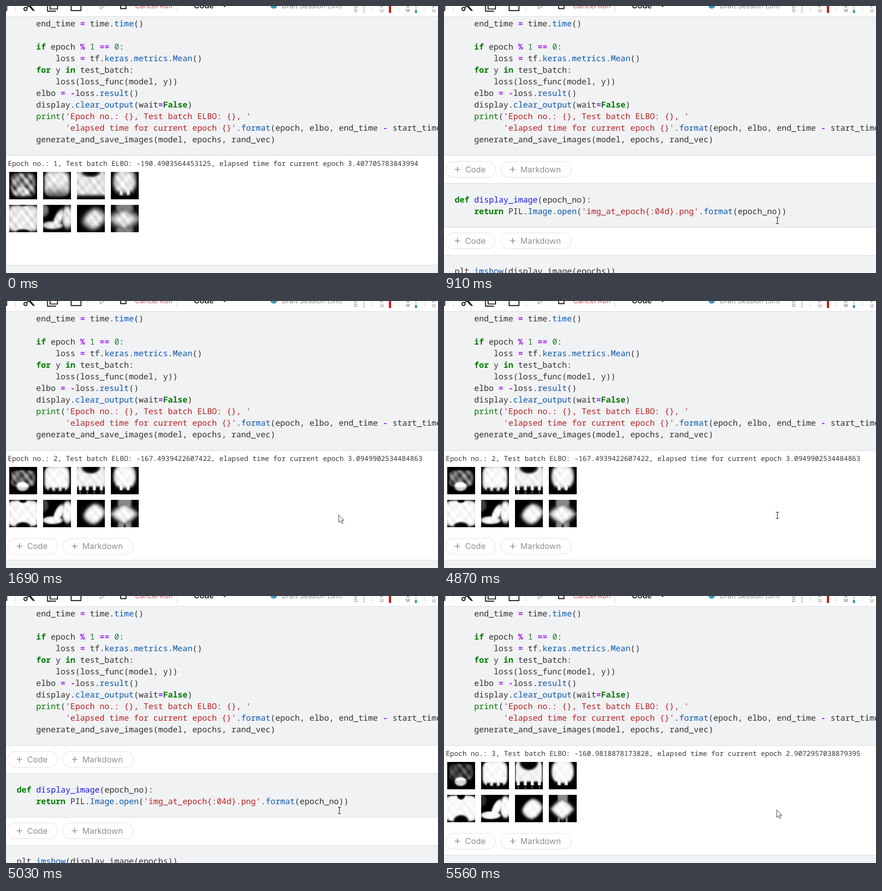
An HTML page with a canvas for the animation above (8 s loop, 931 by 576 pixels).

```html
<!DOCTYPE html>
<html lang="en">
<head>
<meta charset="utf-8">
<title>Notebook training output</title>
<style>
html, body { margin: 0; width: 100%; height: 100%; overflow: hidden; background: #fff; }
svg { display: block; }
canvas { position: absolute; left: 0; top: 350px; }
text { white-space: pre; text-rendering: geometricPrecision; }
.code { font: 17.54px "Noto Sans Mono", monospace; fill: #303030; }
.out { font: 14.9px "Noto Sans Mono", monospace; fill: #383838; }
.ui { font-family: Inter, sans-serif; }
.k { fill: #007a00; font-weight: 700; }
.b { fill: #007a00; }
.o { fill: #a21ff5; font-weight: 700; }
.s { fill: #ba2121; }
.n { fill: #1b7a2b; }
.p { fill: #0b57ad; }
.f { fill: #1a1ae6; }
</style>
</head>
<body>
<svg id="stage" width="931" height="576" viewBox="0 0 931 576">
  <rect width="931" height="576" fill="#fff"/>
  <g id="main"></g>
  <text id="log" class="out" x="4" y="345"></text>
  <g id="below"></g>
  <g id="bar"></g>
  <path id="arrow" d="M0 0V16L3.7 12.6 6.3 18.3 9 17.2 6.5 11.6H11.3Z" fill="#fff" stroke="#222"/>
  <path id="beam" d="M715 455.5h2.5l1 1 1-1h2.5M718.5 456.5v12M715 469.5h2.5l1-1 1 1h2.5"
    fill="none" stroke="#222" stroke-width="1.2"/>
</svg>
<canvas id="tiles" width="300" height="150"></canvas>
<script>
const $ = id => document.getElementById(id);
const rep = (list, fn) => list.map(fn).join('');

// Tokens are split by "|"; an optional "x~" prefix names the colour class.
function code(x, y, src) {
  const spans = rep(src.split('|'), tok => {
    const m = /^([kbosnpf])~(.*)$/.exec(tok);
    return m ? `<tspan class="${m[1]}">${m[2]}</tspan>` : tok;
  });
  return `<text class="code" x="${x}" y="${y}">${spans}</text>`;
}

const label = (x, y, size, color, str, extra = '') =>
  `<text class="ui" x="${x}" y="${y}" font-size="${size}" fill="${color}" ${extra}>${str}</text>`;

const cell = (y, h) =>
  `<rect x="-4.5" y="${y}" width="960" height="${h}" rx="7" fill="#f1f2f4" stroke="#d8dadd"/>`;

function pill(x, y, w, str) {
  return `<rect x="${x}" y="${y}" width="${w}" height="34" rx="17" fill="#fff" stroke="#dcdee0"/>
    <path d="M${x + 19.5} ${y + 17}h12m-6-6v12" stroke="#8c8c8c" stroke-width="1.6"/>` +
    label(x + 42, y + 23.3, 17.5, '#8f8f8f', str);
}
const buttons = y => pill(3.5, y, 108, 'Code') + pill(122.5, y, 152, 'Markdown');

const lines = [
  'end_time |o~=| time.|p~time|()',
  '',
  'k~if| epoch |o~%| |n~1| |o~==| |n~0|:',
  '    loss |o~=| tf.|p~keras|.|p~metrics|.|p~Mean|()',
  'k~for| y |k~in| test_batch:',
  '    loss(loss_func(model, y))',
  'elbo |o~=| |o~-|loss.|p~result|()',
  'display.|p~clear_output|(wait|o~=|k~False|)',
  "b~print|(|s~'Epoch no.: {}, Test batch ELBO: {}, '",
  "      |s~'elapsed time for current epoch {}'|.|p~format|(epoch, elbo, end_time |o~-| start_time))",
  'generate_and_save_images(model, epochs, rand_vec)'
];
$('main').innerHTML = cell(-40, 362.5) + rep(lines, (s, i) => code(65, 44 + 25 * i, s));

$('below').innerHTML = `<g id="first">${buttons(335.5)}</g>` + cell(382.5, 95) +
  code(23, 424, 'k~def| |f~display_image|(epoch_no):') +
  code(65, 449, "k~return| PIL.|p~Image|.|p~open|(|s~'img_at_epoch{:04d}.png'|.|p~format|(epoch_no))") +
  buttons(489.5) + cell(538, 95) +
  code(23, 578, 'plt.|p~imshow|(display_image(epochs))');

const meter = (x, a, b, fill, top) =>
  label(x, 3.6, 9.5, '#666', a, 'text-anchor="middle"') +
  label(x, 12.6, 9.5, '#666', b, 'text-anchor="middle"') +
  `<path d="M${x + 17.5} 0V15" stroke="#e2e2e2" stroke-width="5"/>
   <path d="M${x + 17.5} ${top}V15" stroke="${fill}" stroke-width="5"/>`;

$('bar').innerHTML = `<rect width="931" height="22" fill="#fff"/>
  <path d="M0 22.5H931" stroke="#dcdee0"/>
  <path d="${rep([20, 176, 368, 789, 845, 901], x => `M${x}.5 0v14`)}" stroke="#d5d7da"/>
  <g fill="none" stroke="#202124" stroke-width="2.2">
    <path d="M0 9.5H1.5V0"/>
    <circle cx="42" cy="6.5" r="3.4"/><path d="M44.5 4L51-2.5"/>
    <path d="M48 0L52-2 62.5 10.5H58Z" fill="#202124" stroke="none"/>
    <path d="M89.5 0V11.2H108M95 0V6.5H111V0"/>
    <path d="M140.5 0V9.8H161.5V0"/>
    <path d="M247 0V5.6H258.5V0"/>
    <path d="M203 0V6L213-.5" stroke="#aaa" stroke-width="1.6"/>
    <path d="M467.5-2L471 1.2 474.5-2" stroke-width="1.8"/>
  </g>
  <circle cx="577" cy="-1.5" r="7.3" fill="#3d98b8"/>` +
  label(278, 4.5, 15, '#cf5b5b', 'Cancel Run') +
  label(404.5, 5, 17, '#202124', 'Code', 'font-weight="600"') +
  label(594.5, 4.5, 14.8, '#8b8f94', 'Draft Session (5m)') +
  meter(754, 'D', 'D', '#e2e2e2', 13) + meter(810, 'P', 'U', '#c5221f', 0) +
  meter(866, 'A', 'M', '#3d98b8', 9) + meter(922, 'P', 'U', '#e2e2e2', 13);

// Generated samples: brightness fields over u, v in -1..1 that sharpen with each epoch e.
// blob is positive inside a superellipse, gaps is positive between legs below v = top.
const blob = (u, v, cx, cy, rx, ry, n = 2) =>
  1 - Math.abs((u - cx) / rx) ** n - Math.abs((v - cy) / ry) ** n;
const gaps = (u, v, top, pitch) =>
  Math.min((v - top) * 4, Math.cos(2 * Math.PI * u / pitch) + .1);
const cut = (a, b) => Math.min(a, -b);
const lit = (d, e) => 1 / (1 + Math.exp(-(4 + 2 * e) * d));
const ripple = (u, v, s) => Math.sin(8 * u + 3 * s) * Math.sin(7 * v + 5 * s) + .6 * Math.sin(13 * u - 9 * v + s);

const samples = [
  (u, v, e) => lit(blob(u, v, 0, -.15 + .1 * (1 - e), .85, .6 + .25 * (e < 1), 4), e) * (.6 - .17 * e) *
    (1 + .45 * ripple(u, v, 2)) + lit(blob(u, v, -.03, .45, .42, .32), e) * (e ? .85 : .3),
  (u, v, e) => lit(cut(blob(u, v, 0, -.15, .88, .9, 4), e ? gaps(u, v, .55, .45) : v - .6), e),
  (u, v, e) => lit(cut(cut(blob(u, v, 0, 0, 1.15 - .1 * e, 1.1, 6), blob(u, v, 0, -1, .65, .35 + .12 * e)),
    e ? gaps(u, v, .45, .5) + (v > .7) : 4 * (v - .72)), e) * .97,
  (u, v, e) => lit(Math.max(blob(u, v, 0, -.3, .78, .85, 2.5),
    cut(blob(u, v, 0, .3, .6, .42, 4), gaps(u, v, .4, .5))), e),
  (u, v, e) => lit(cut(cut(blob(u, v, 0, 0, 1.1, .95, 5), blob(u, v, 0, 1, .55, .2 + .15 * e)),
    blob(u, v, 0, -1, .3, .1 + .12 * e)), e),
  (u, v, e) => lit(Math.max(blob(u, v, .75, -.1, .38, .8), blob(u, v, -.3, .5, .7, .28),
    blob(u + .35 * v, v, .12, 0, .3, .65)), e) + .5 * lit(blob(u, v, -.95, -.6, .35, .45), e) / (1 + e),
  (u, v, e) => lit(blob(u, v + .15 * u, .25, .08, .76 - .03 * e, .72, 1.6), e),
  (u, v, e) => Math.max(.55 * lit(1 - (u / (.6 - .12 * e)) ** 2, e) * (v < 0 || Math.abs(u) > .1 * e),
    lit(blob(u, v, -.03, .05, 1.02 - .12 * e, .72, 1.25), e))
];

const size = 28;
function sampleTile(fn, e, seed) {
  const tile = document.createElement('canvas');
  tile.width = tile.height = size;
  const ctx = tile.getContext('2d'), img = ctx.createImageData(size, size);
  for (let i = 0; i < size * size; i++) {
    const x = i % size, y = Math.floor(i / size);
    const u = (x + .5) * 2 / size - 1, v = (y + .5) * 2 / size - 1;
    const grain = .07 * ripple(u, v, seed) / (1 + e);
    const mesh = e ? 1 : 1 - .05 * (x % 2 | y % 2);
    const level = 255 * mesh * (fn(u, v, e) * (.98 + grain));
    img.data.set([level, level, level, 255], i * 4);
  }
  ctx.putImageData(img, 0, 0);
  return tile;
}
const tileSets = [0, 1, 2].map(e => samples.map((fn, i) => sampleTile(fn, e, i)));

function drawTiles(set) {
  const ctx = $('tiles').getContext('2d');
  ctx.imageSmoothingQuality = 'high';
  set.forEach((tile, i) => ctx.drawImage(tile, 6.5 + (i % 4) * 73, 8 + (i >> 2) * 71, 60.5, 58.5));
}

const scores = [
  ['-190.4903564453125', '3.407705783843994'],
  ['-167.4939422607422', '3.0949902534484863'],
  ['-160.9818878173828', '2.9072957038879395']
];
const logs = scores.map(([elbo, sec], i) =>
  `Epoch no.: ${i + 1}, Test batch ELBO: ${elbo}, elapsed time for current epoch ${sec}`);

// [start, epoch index, stage]: 0 cleared, 1 log only, 2 log and tiles
const states = [[0, 0, 2], [910, 1, 0], [1290, 1, 1], [1690, 1, 2], [4950, 2, 0], [5180, 2, 1], [5560, 2, 2]];
const shift = [0, 31, 176.5];
const show = (id, on) => $(id).style.display = on ? '' : 'none';
const within = (t, a, b) => t >= a && t < b;
let last = null;

function draw(t) {
  const state = states.filter(s => s[0] <= t).pop();
  if (state !== last) {
    const [, epoch, stage] = last = state;
    $('log').textContent = stage ? logs[epoch] : '';
    show('tiles', stage === 2);
    if (stage === 2) drawTiles(tileSets[epoch]);
    $('below').setAttribute('transform', `translate(0 ${shift[stage]})`);
  }
  // The pointer glides in and the buttons fade up in four 80 ms steps.
  const step = Math.max(0, Math.min(4, Math.floor((t - 210) / 80) + 1));
  $('first').setAttribute('opacity', step / 4);
  const rest = ((4 - step) / 3) ** 2;
  $('arrow').setAttribute('transform', `translate(${717 + 108 * rest} ${461.5 + 89 * rest})`);
  const beam = within(t, 760, 1540) || within(t, 4870, 5410);
  show('beam', beam);
  show('arrow', t >= 210 && !beam);
}

const start = performance.now();
function tick() {
  draw((performance.now() - start) % 8000);
  requestAnimationFrame(tick);
}
tick();
</script>
</body>
</html>
```
